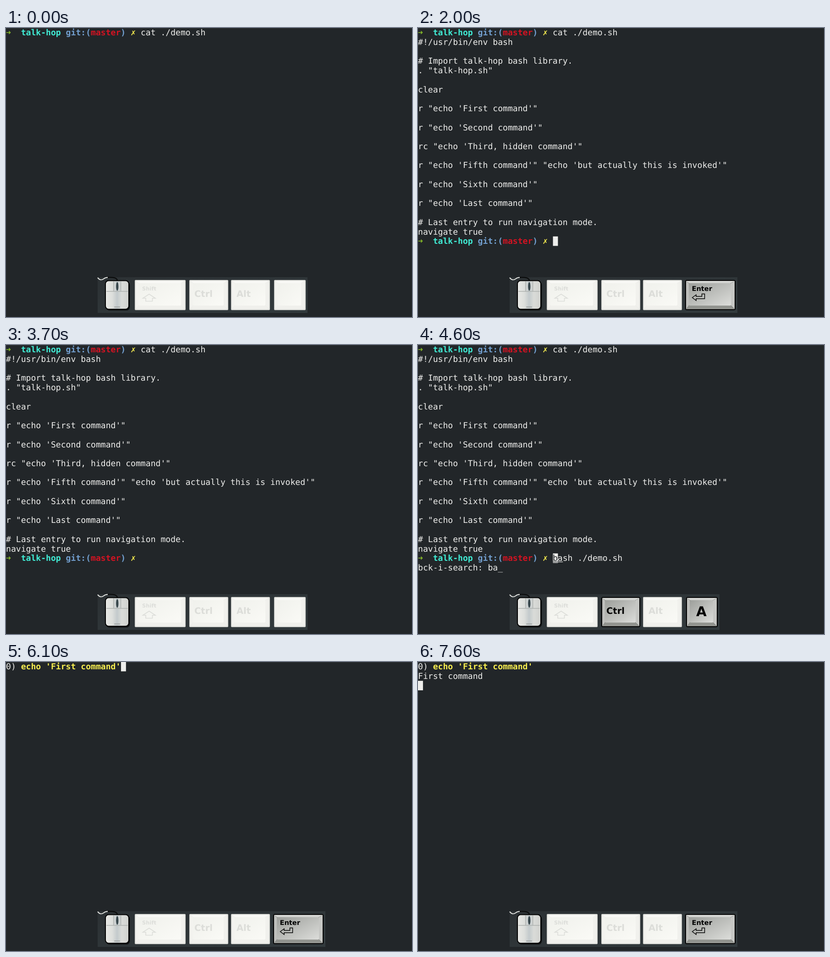
Write an HTML page that moves like this. It is 886x632 px and loops after 8000 ms.

```html
<!DOCTYPE html>
<html lang="en">
<head>
<meta charset="utf-8">
<title>Terminal demo</title>
<style>
html, body { margin: 0; width: 100%; height: 100%; overflow: hidden; background: #222629; }
svg { display: block; }
text { white-space: pre; text-rendering: geometricPrecision; }
.term { font: 18.08px "DejaVu Sans Mono", monospace; }
.bold { font-weight: bold; }
.label { font-family: "DejaVu Sans", sans-serif; font-weight: bold; }
</style>
</head>
<body>
<svg width="886" height="632" viewBox="0 0 886 632">
  <defs>
    <linearGradient id="offFace" x2="1" y2="1"><stop stop-color="#f0f1ec"/><stop offset="1" stop-color="#fafaf6"/></linearGradient>
    <linearGradient id="onFace" x2="1" y2="1"><stop stop-color="#9d9f9b"/><stop offset="1" stop-color="#dcddda"/></linearGradient>
    <linearGradient id="mouse"><stop stop-color="#e9eae7"/><stop offset=".3" stop-color="#dcdedb"/><stop offset=".5" stop-color="#c3cacc"/><stop offset=".7" stop-color="#d9dbd8"/><stop offset="1" stop-color="#d0d1ce"/></linearGradient>
    <linearGradient id="panel" x2="1" y2="1"><stop stop-color="#2c3134"/><stop offset="1" stop-color="#323a3d"/></linearGradient>
  </defs>
  <rect width="886" height="632" fill="#222629"/>
  <rect width="886" height="1" fill="#2d3234"/>
  <g id="scene"></g>
</svg>
<script>
const LOOP = 8000, CELL = 10.885, ROW = 20.73;
const FG = '#eeeeec', BG = '#222629', YELLOW = '#f7ee50';
const NAME = 'talk-hop';
const BLINKS = [200, 800, 1400, 2500, 3100, 3700, 3900, 5200, 5800, 6700, 7300];
const SCRIPT = `#!/usr/bin/env bash

# Import ${NAME} bash library.
. "${NAME}.sh"

clear

r "echo 'First command'"

r "echo 'Second command'"

rc "echo 'Third, hidden command'"

r "echo 'Fifth command'" "echo 'but actually this is invoked'"

r "echo 'Sixth command'"

r "echo 'Last command'"

# Last entry to run navigation mode.
navigate true`.split('\n');

const rect = (x, y, w, h, fill, extra = '') =>
  `<rect x="${x}" y="${y}" width="${w}" height="${h}" fill="${fill}" ${extra}/>`;
const path = (d, stroke, width, fill = 'none') =>
  `<path d="${d}" stroke="${stroke}" stroke-width="${width}" fill="${fill}"/>`;
const print = (col, row, str, color = FG, bold = '') =>
  `<text class="term ${bold}" x="${col * CELL}" y="${row * ROW + 16.2}" fill="${color}">${str}</text>`;
const label = (x, y, size, str, color, anchor = 'start') =>
  `<text class="label" x="${x}" y="${y}" font-size="${size}" fill="${color}" text-anchor="${anchor}">${str}</text>`;

const prompt = row =>
  print(0, row, '➜', '#86b929', 'bold') +
  print(3, row, NAME, '#40ebd4', 'bold') +
  print(12, row, 'git:(', '#729fcf', 'bold') +
  print(17, row, 'master', '#d31322', 'bold') +
  print(23, row, ')', '#729fcf', 'bold') +
  print(25, row, '✗', YELLOW, 'bold');

function terminal(t) {
  const on = BLINKS.filter(b => b <= t).length % 2;
  const [col, row] = t < 1900 ? [27, 0] : t < 6100 ? [27, 22] : t < 7600 ? [23, 0] : [0, 2];
  const cursor = on ? rect(col * CELL + (col ? .6 : 0), row * ROW - .3, CELL, ROW, FG) : '';

  if (t >= 6100) {
    return print(0, 0, '0)') + print(3, 0, "echo 'First command'", YELLOW, 'bold') +
      (t >= 7600 ? print(0, 1, 'First command') : '') + cursor;
  }
  let out = prompt(0) + print(27, 0, 'cat ./demo.sh');
  if (t >= 1900) out += SCRIPT.map((line, i) => print(0, i + 1, line)).join('') + prompt(22);
  out += cursor;
  if (t >= 4100) {
    const query = t < 4500 ? '' : t < 4600 ? 'b' : 'ba';
    out += print(0, 23, `bck-i-search: ${query}_`);
    if (query) {
      const ink = on ? BG : FG, y = 22 * ROW + 17.7;
      out += print(27, 22, 'b', ink) + print(28, 22, 'ash ./demo.sh') +
        rect(27 * CELL + .6, y, CELL, 1.2, ink);
      if (query === 'ba') out += rect(28 * CELL + .6, y, CELL, 1.2, FG);
    }
  }
  return out;
}

// A bevelled key cap; the four edge shades run top, right, bottom, left.
function key(x, w, pressed) {
  const y = 551, h = 66, r = x + w, b = y + h;
  const [L, T, R, B] = [x + 8, y + 7, r - 10, b - 10];
  const [top, right, bottom, left] = pressed
    ? ['#d3d4d1', '#c6c7c4', '#92948f', '#bebfbc']
    : ['#f8f8f5', '#f1f1ed', '#f0f0ec', '#f3f3ef'];
  const edge = (points, fill) => `<polygon points="${points}" fill="${fill}"/>`;
  const i = 2;
  return rect(x, y, w, h, pressed ? '#000' : '#d9dad6', `rx="${pressed ? 3.5 : 2}"`) +
    edge([x + i, y + i, r - i, y + i, R, T, L, T], top) +
    edge([r - i, y + i, r - i, b - i, R, B, R, T], right) +
    edge([x + i, b - i, r - i, b - i, R, B, L, B], bottom) +
    edge([x + i, y + i, x + i, b - i, L, B, L, T], left) +
    rect(L, T, R - L, B - T, pressed ? 'url(#onFace)' : 'url(#offFace)', 'rx="1"');
}

const mouse =
  path('M200 546 C205 552 209 552 214 548 Q217 545.5 222 545.5', '#e4e5e2', 2) +
  path('M222 545.5 C234 545 243 546 243 553', '#0b0c0c', 2.4) +
  rect(218, 554, 52.5, 64, '#111415', 'rx="8"') +
  rect(217, 552.5, 51, 62.5, 'url(#mouse)', 'rx="7" stroke="#000" stroke-width="2"') +
  path('M219 576 H266 M235 554 V576 M250.5 554 V576', '#afb2b0', 1.6) +
  '<ellipse cx="242.8" cy="565" rx="2.6" ry="9.5" fill="#37464b"/>' +
  rect(236, 609, 13, 2.2, '#a4a8a7', 'rx="1"');

function keyboard(t) {
  const enter = t >= 2000 && t < 2500 || t >= 6100 && t < 6600 || t >= 7600;
  const ctrl = t >= 3900 && t < 5200;
  const letter = !ctrl || t < 4200 ? '' : t < 4500 ? 'R' : t < 4600 ? 'B' : 'A';
  const dim = '#dcddd9';
  return rect(200, 545, enter ? 497 : 458, 78, 'url(#panel)') + mouse +
    key(281, 111, false) + label(297, 574.3, 11.5, 'Shift', dim) +
    path('M312.3 582 L326 591 H319.5 V597.5 H305 V591 H298.5Z', dim, 1.6) +
    key(400, 85, ctrl) + label(411, 588, 19.5, 'Ctrl', ctrl ? '#000' : dim) +
    key(491, 85, false) + label(503, 588, 19.5, 'Alt', dim) +
    (enter
      ? key(583, 110, true) + label(597.5, 574.5, 14.6, 'Enter', '#000') +
        path('M598.5 589.5 L607 583.5 V587 H619.5 V581.5 H625.5 V592 H607 V596Z', '#000', 1.5)
      : key(585, 69, !!letter) + label(618.5, 593.3, 29.5, letter, '#000', 'middle'));
}

const scene = document.getElementById('scene');
let shown = '';
function frame() {
  const t = performance.now() % LOOP;
  const markup = terminal(t) + keyboard(t);
  if (markup !== shown) scene.innerHTML = shown = markup;
  requestAnimationFrame(frame);
}
frame();
</script>
</body>
</html>
```
